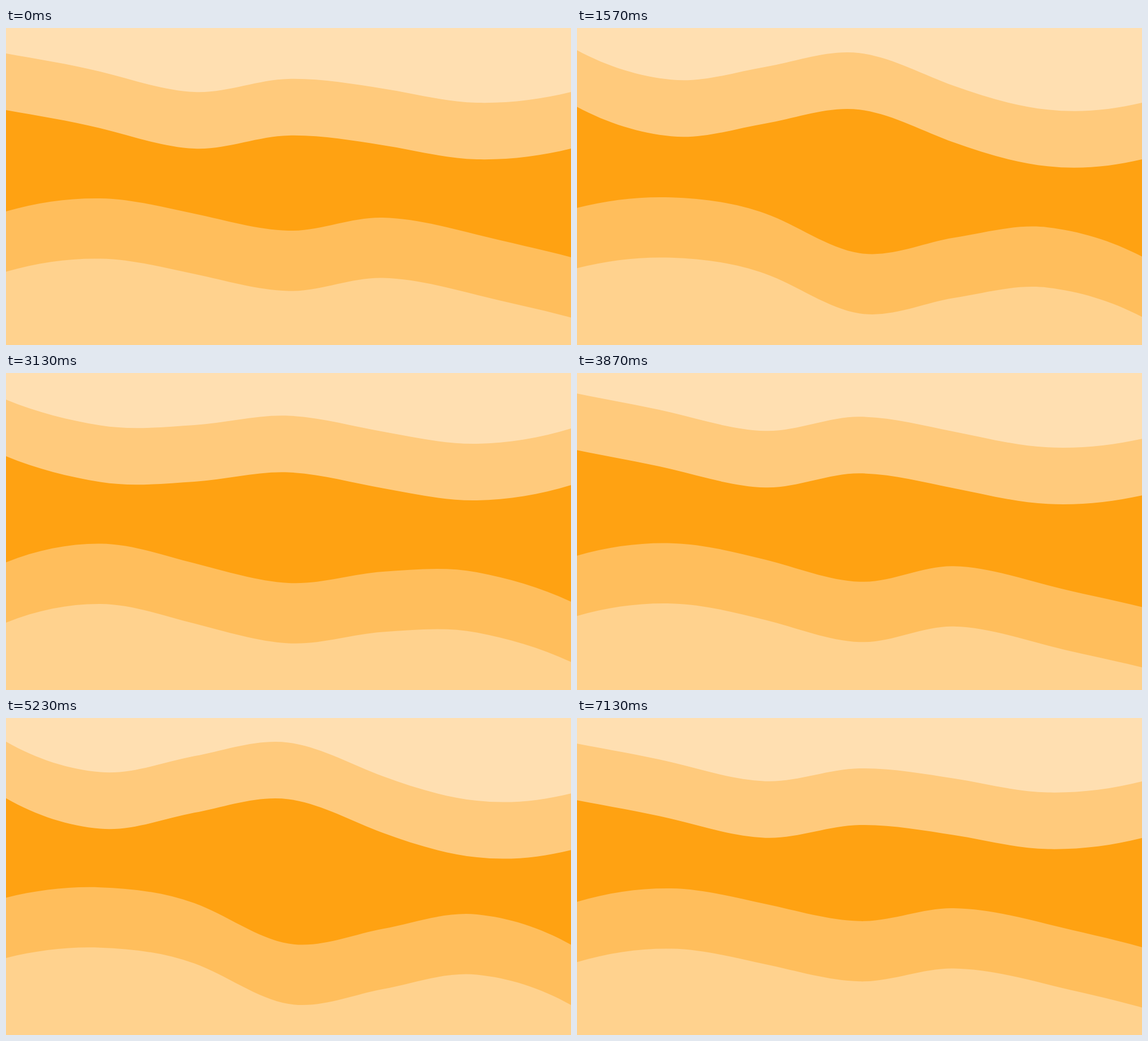
An HTML page that plays this animation: 999 px wide and 560 px high, repeating every 7.16 s.

```html
<!DOCTYPE html>
<html lang="en">
<head>
<meta charset="utf-8">
<title>Orange waves</title>
<style>
  html, body { margin: 0; width: 100%; height: 100%; overflow: hidden; background: #ffdfb1; }
  svg { display: block; width: 100%; height: 100%; }
</style>
</head>
<body>
<svg viewBox="0 0 999 560" preserveAspectRatio="none">
  <path id="upper" fill="#ffca7c"/>
  <path id="middle" fill="#ffa212"/>
  <path id="lower" fill="#ffbe5c"/>
  <path id="bottom" fill="#ffd28e"/>
</svg>
<script>
const WIDTH = 999, HEIGHT = 560, CYCLE = 3580;

// Each outline morphs through four poses, a quarter cycle apart.
// A pose is seven key heights, evenly spaced from left to right.
const topPoses = [
  [45, 77, 113, 90, 107, 132, 113],
  [18, 55, 80, 51, 96, 130, 123],
  [46, 103, 65, 42, 104, 149, 135],
  [49, 108, 71, 61, 100, 118, 83]
];
const lowPoses = [
  [324, 301, 328, 358, 335, 365, 405],
  [320, 300, 333, 391, 354, 396, 431],
  [317, 299, 326, 400, 376, 338, 395],
  [345, 302, 344, 384, 367, 339, 403]
];

function morph(poses, progress) {
  const i = Math.floor(progress), u = progress - i;
  const next = poses[(i + 1) % poses.length];
  return poses[i].map((y, k) => y + (next[k] - y) * u);
}

// Smooth curve through the heights, filled down to the stage's lower edge.
function wavePath(ys) {
  const last = ys.length - 1, step = WIDTH / last;
  const endSlope = (a, b, c) => (4 * b - 3 * a - c) / 2;
  const slopes = ys.map((y, i) =>
    i === 0 ? endSlope(...ys) :
    i === last ? -endSlope(y, ys[i - 1], ys[i - 2]) :
    (ys[i + 1] - ys[i - 1]) * 0.6);

  let d = `M0 ${HEIGHT}V${ys[0]}`;
  for (let i = 0; i < last; i++) {
    const x = i * step;
    d += `C${x + step / 3} ${ys[i] + slopes[i] / 3} `
      + `${x + step * 2 / 3} ${ys[i + 1] - slopes[i + 1] / 3} `
      + `${x + step} ${ys[i + 1]}`;
  }
  return d + `V${HEIGHT}Z`;
}

function draw(id, ys, shift = 0) {
  document.getElementById(id).setAttribute("d", wavePath(ys.map(y => y + shift)));
}

function frame() {
  const progress = performance.now() % CYCLE / CYCLE * topPoses.length;
  const top = morph(topPoses, progress), low = morph(lowPoses, progress);
  draw("upper", top);
  draw("middle", top, 100);
  draw("lower", low);
  draw("bottom", low, 106.5);
  requestAnimationFrame(frame);
}
frame();
</script>
</body>
</html>
```
